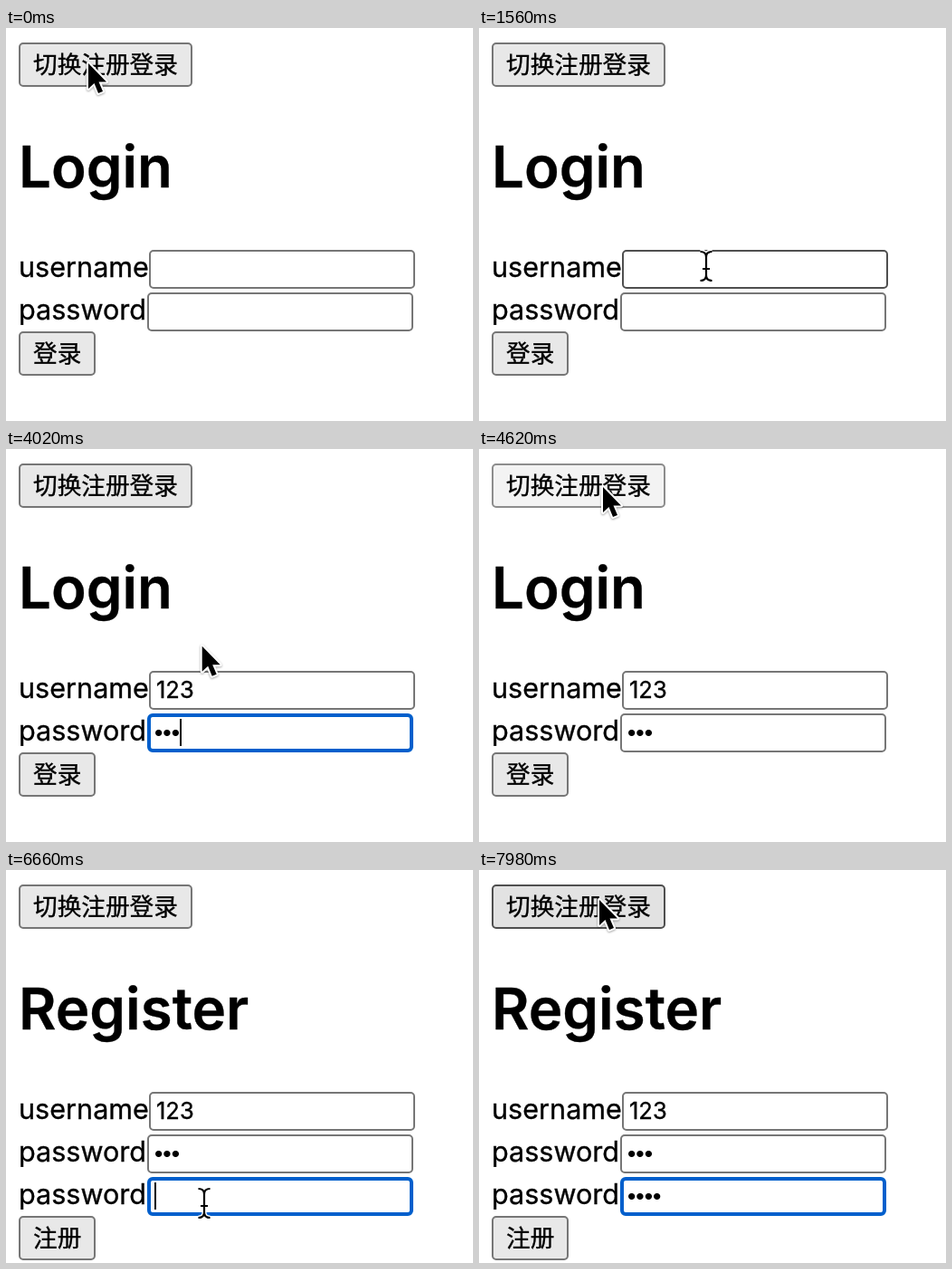
Write an HTML page that moves like this. It is 516 px wide and 434 px high and loops after 8 s.

```html
<!DOCTYPE html>
<html lang="zh-CN">
<head>
<meta charset="utf-8">
<title>Login / Register</title>
<style>
  html, body { margin: 0; width: 100%; height: 100%; overflow: hidden; background: #fff; }
  svg { display: block; width: 516px; height: 434px; }
  text { stroke: #000; stroke-width: .35px; }
  .label { font: 30.6px Inter, "Open Sans", sans-serif; }
  .title { font: 600 63.6px Inter, "Open Sans", sans-serif; }
  .value { font: 25.5px Inter, "Open Sans", sans-serif; }
  .secret { font: 26.67px "Liberation Sans", Arial, sans-serif; stroke: none; }
  .button { font: 26.67px "Noto Sans CJK SC", "Noto Sans CJK", "Noto Sans CJK JP", sans-serif; }
  #arrow { filter: drop-shadow(0 1px 1px rgba(0, 0, 0, .35)); }
</style>
</head>
<body>
<svg id="stage" viewBox="0 0 516 434" xmlns="http://www.w3.org/2000/svg">
  <text id="title" class="title" x="14" y="176"></text>
  <g id="form"></g>
  <g id="arrow"></g>
  <g id="beam" fill="none"></g>
</svg>
<script>
const LOOP = 8000, TICK = 60, BLINK = 480;
const HOVER_FROM = 1560, PRESS = 4560, SWITCH = 4680;
const ARROW = 'M0 0V28L6.5 22L11 33L16 31L11.5 20.5H20Z';
const BEAM = 'M-6.5 -16Q0 -16 0 -10V10Q0 16 -6.5 16M6.5 -16Q0 -16 0 -10M0 10Q0 16 6.5 16M-4 3H4';
const ORIGIN = { x: 91, y: 39 };

const move = (start, duration, x, y) => ({ start, duration, x, y });
const moves = [
  move(0, 240, 221, 162),
  move(240, 180, 118, 30),
  move(720, 420, 251, 263),
  move(1560, 180, 235, 265),
  move(3000, 240, 254, 311),
  move(3900, 300, 148, 46),
  move(4380, 120, 137, 42),
  move(4680, 420, 439, 270),
  move(5760, 300, 230, 314),
  move(6420, 60, 219, 368),
  move(7080, 600, 140, 2),
  move(7800, 180, 133, 33)
];

// A click focuses a field, then keys follow at a steady pace
const entry = (click, field, firstKey, pace, length) => ({ click, field, firstKey, pace, length });
const entries = [
  entry(1860, 0, 2580, 120, 3),
  entry(3360, 1, 3600, 150, 3),
  entry(5160, 0, 5340, 120, 3),
  entry(6120, 1, 6300, 60, 3),
  entry(6660, 2, 6780, 90, 4)
];

const $ = id => document.getElementById(id);
function set(node, attrs) {
  for (const key in attrs) node.setAttribute(key, attrs[key]);
}
function add(parent, tag, attrs, text = '') {
  const node = document.createElementNS('http://www.w3.org/2000/svg', tag);
  set(node, attrs);
  node.textContent = text;
  parent.appendChild(node);
  return node;
}
const show = (node, on) => set(node, { visibility: on ? 'visible' : 'hidden' });

function makeField(label, row) {
  const secret = row > 0;
  const x = secret ? 156 : 158, y = 245 + 47 * row;
  const group = add($('form'), 'g', {});
  add(group, 'text', { class: 'label', x: 14, y: y + 30 }, label);
  const halo = add(group, 'rect', { x: x - 2, y: y - 2, width: 298, height: 47, rx: 6, fill: '#fff' });
  const frame = add(group, 'rect', { fill: '#fff' });
  const value = add(group, 'text', { class: secret ? 'secret' : 'value', x: x + 8, y: y + 30 });
  const caret = add(group, 'rect', { y: y + 6, width: 2, height: 30 });
  return { x, y, w: 294, h: 43, secret, group, halo, frame, value, caret };
}

function makeButton(label, y, w) {
  const group = add($('form'), 'g', {});
  const frame = add(group, 'rect', { x: 15, y: y + 1, width: w - 2, height: 47, rx: 4, 'stroke-width': 2 });
  const text = add(group, 'text', { class: 'button', x: 30, y: y + 34 }, label);
  return { x: 14, y, w, h: 49, group, frame, text };
}

const fields = ['username', 'password', 'password'].map(makeField);
const toggle = makeButton('切换注册登录', 16, 192);
const submit = makeButton('登录', 335, 85);
add($('arrow'), 'path', { d: ARROW, stroke: '#fff', 'stroke-width': 4, 'stroke-linejoin': 'round' });
add($('arrow'), 'path', { d: ARROW });
add($('beam'), 'path', { d: BEAM, stroke: '#fff', 'stroke-width': 5 });
add($('beam'), 'path', { d: BEAM, stroke: '#000', 'stroke-width': 2.2 });

const inside = (box, p) => p.x >= box.x && p.x < box.x + box.w && p.y >= box.y && p.y < box.y + box.h;
const ease = k => k * k * (3 - 2 * k);

function pointerAt(t) {
  const index = moves.findLastIndex(m => m.start <= t);
  const from = moves[index - 1] || ORIGIN, to = moves[index];
  const k = ease(Math.min(1, (t - to.start) / to.duration));
  return { x: from.x + (to.x - from.x) * k, y: from.y + (to.y - from.y) * k, movedAt: to.start };
}

const typed = (e, t) =>
  t < e.firstKey ? 0 : Math.min(e.length, 1 + Math.floor((t - e.firstKey) / e.pace));

function drawField(field, count, focused, hovered, caretOn) {
  const inset = focused ? 2 : 1;
  set(field.frame, {
    x: field.x + inset, y: field.y + inset,
    width: field.w - 2 * inset, height: field.h - 2 * inset,
    rx: 4, 'stroke-width': 2 * inset,
    stroke: focused ? '#005fcc' : hovered ? '#4f4f4f' : '#767676'
  });
  show(field.halo, focused);
  field.value.textContent = field.secret ? '•'.repeat(count) : '123'.slice(0, count);
  const width = count ? field.value.getComputedTextLength() : 0;
  set(field.caret, { x: field.x + 8 + width });
  show(field.caret, focused && caretOn);
}

function drawButton(button, hovered, pressed) {
  set(button.frame, {
    fill: pressed ? '#f3f3f3' : hovered ? '#e2e2e2' : '#e8e8e8',
    stroke: pressed ? '#8d8d8d' : hovered ? '#4f4f4f' : '#767676'
  });
}

function render(time) {
  const t = Math.floor(time / TICK) * TICK;
  const register = t >= SWITCH;
  const pointer = pointerAt(t);
  const hovers = box => t >= HOVER_FROM && inside(box, pointer);

  const past = entries.filter(e => e.click <= t && (e.click >= SWITCH) === register);
  const last = past[past.length - 1];
  const active = last && !(t >= PRESS && last.click < PRESS) ? last : null;
  const count = active ? typed(active, t) : 0;
  const changed = count ? active.firstKey + (count - 1) * active.pace : active ? active.click : 0;
  const caretOn = Math.floor((t - changed) / BLINK) % 2 === 0;

  $('title').textContent = register ? 'Register' : 'Login';
  const shown = register ? fields : fields.slice(0, 2);
  show(fields[2].group, register);
  show(fields[2].halo, false);
  show(fields[2].caret, false);
  shown.forEach((field, i) => {
    const own = past.find(e => e.field === i);
    const focused = Boolean(active) && active.field === i;
    drawField(field, own ? typed(own, t) : 0, focused, hovers(field), caretOn);
  });

  drawButton(toggle, hovers(toggle), t >= PRESS && t < SWITCH);
  drawButton(submit, false, false);
  submit.text.textContent = register ? '注册' : '登录';
  set(submit.group, { transform: `translate(0 ${register ? 47 : 0})` });

  // Typing hides the pointer until it moves again
  const hidden = count > 0 && pointer.movedAt < active.firstKey;
  const overField = shown.some(hovers);
  const place = { transform: `translate(${pointer.x} ${pointer.y})` };
  set($('arrow'), place);
  set($('beam'), place);
  show($('arrow'), !hidden && !overField);
  show($('beam'), !hidden && overField);
}

const start = performance.now();
function loop() {
  render((performance.now() - start) % LOOP);
  requestAnimationFrame(loop);
}
loop();
</script>
</body>
</html>
```
